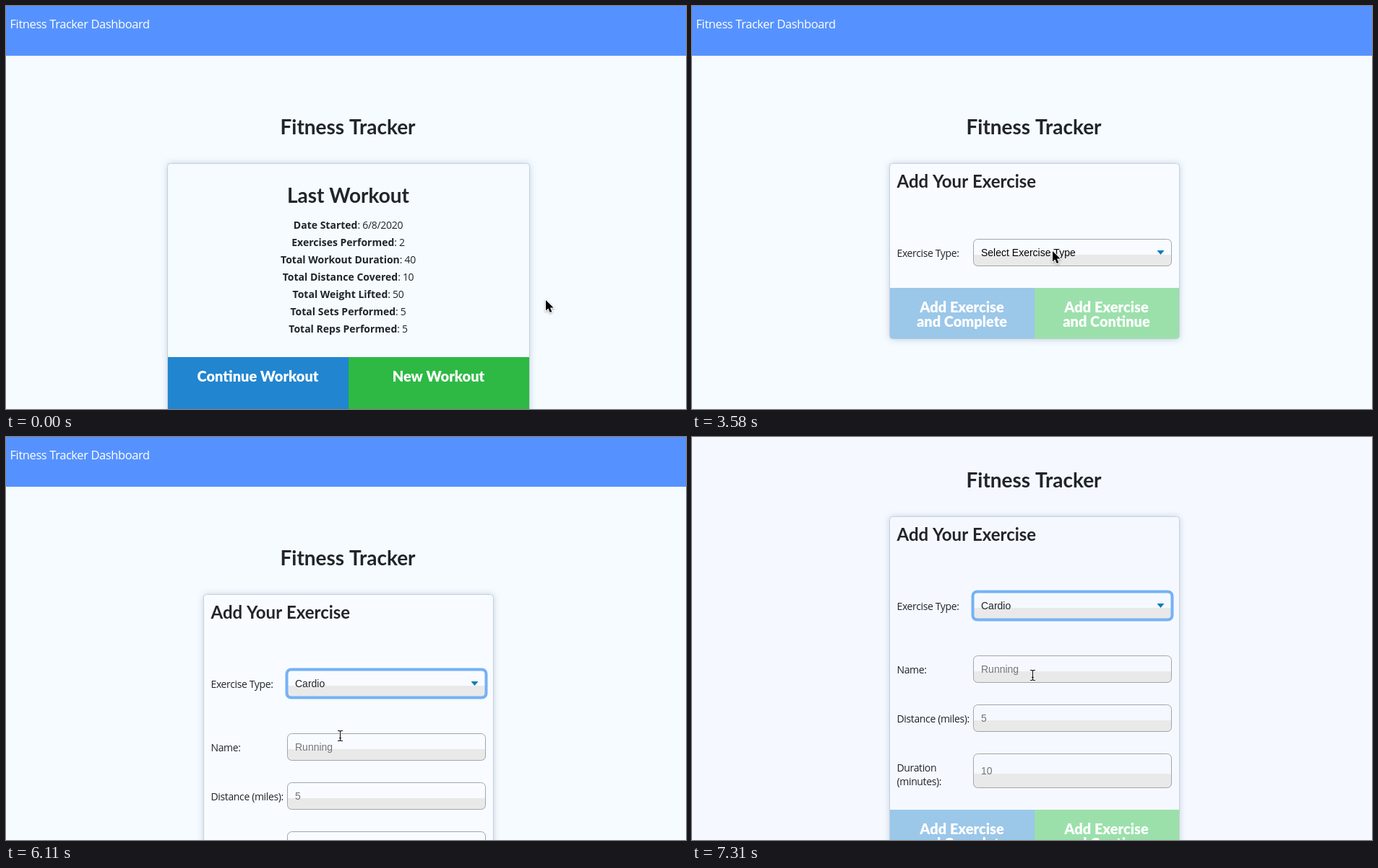
An HTML page with a canvas that plays this animation: 941x559 px, repeating every 8 s.

```html
<!DOCTYPE html>
<html lang="en">
<head>
<meta charset="utf-8">
<title>Fitness Tracker</title>
<style>
html, body { margin: 0; width: 100%; height: 100%; overflow: hidden; background: #f5fbff; }
canvas { display: block; }
</style>
</head>
<body>
<canvas id="stage" width="941" height="559"></canvas>
<script>
const ctx = document.getElementById('stage').getContext('2d');
const LOOP = 8000, TICK = 150;
const HEAD = 'Lato, sans-serif';
const BODY = '"Open Sans", sans-serif';
const FIELD = '"Liberation Sans", Arial, sans-serif';
const MENU = 'Inter, sans-serif';
const INK = '#212529';

function text(str, x, y, font, color = INK, align = 'left', spacing = 0) {
  ctx.font = font;
  ctx.fillStyle = color;
  ctx.textAlign = align;
  ctx.letterSpacing = spacing + 'px';
  ctx.fillText(str, x, y);
}

function rect(x, y, w, h, color) {
  ctx.fillStyle = color;
  ctx.fillRect(x, y, w, h);
}

function round(x, y, w, h, r) {
  ctx.beginPath();
  ctx.roundRect(x, y, w, h, r);
}

const label = (str, y) => text(str, 283.5, y, '14px ' + BODY, INK, 'left', -0.36);

function card(x, y, w, h, fill) {
  ctx.save();
  ctx.shadowColor = 'rgba(110,135,175,.42)';
  ctx.shadowBlur = 10;
  ctx.shadowOffsetY = 1;
  round(x, y, w, h, 4);
  ctx.fillStyle = fill;
  ctx.fill();
  ctx.restore();
  round(x - 0.5, y + 0.5, w + 1, h, 4);
  ctx.strokeStyle = '#cbd0d6';
  ctx.lineWidth = 1;
  ctx.stroke();
}

function stats() {
  card(224, 218, 500, 400, '#f5fbff');
  text('Last Workout', 473.5, 273, '700 28px ' + HEAD, INK, 'center');
  const rows = [
    ['Date Started', '6/8/2020'], ['Exercises Performed', '2'],
    ['Total Workout Duration', '40'], ['Total Distance Covered', '10'],
    ['Total Weight Lifted', '50'], ['Total Sets Performed', '5'],
    ['Total Reps Performed', '5']
  ];
  const bold = '700 14px ' + BODY, plain = '14px ' + BODY;
  rows.forEach(([name, value], i) => {
    const y = 309 + 24 * i, rest = ': ' + value;
    ctx.letterSpacing = '0px';
    ctx.font = bold;
    const a = ctx.measureText(name).width;
    ctx.letterSpacing = '-0.3px';
    ctx.font = plain;
    const x = 473.5 - (a + ctx.measureText(rest).width) / 2;
    text(name, x, y, bold);
    text(rest, x + a, y, plain, INK, 'left', -0.3);
  });
}

function statButtons(hover) {
  rect(224, 487, 250, 72, hover ? '#1a78c2' : '#2185d0');
  rect(474, 487, 250, 72, '#2db944');
  const font = '900 20px ' + HEAD;
  text('Continue Workout', 348.5, 520.5, font, '#fff', 'center');
  text('New Workout', 598.5, 520.5, font, '#fff', 'center');
}

function field(y, h, value, baseline, color) {
  const split = y + Math.floor(h * 0.59);
  ctx.save();
  round(389, y, 275, h, 6);
  ctx.clip();
  rect(389, split, 275, y + h - split, '#e9e9e9');
  ctx.restore();
  round(389.5, y + 0.5, 274, h - 1, 6);
  ctx.strokeStyle = '#a3a5a8';
  ctx.lineWidth = 1;
  ctx.stroke();
  text(value, 400, baseline, '14px ' + FIELD, color);
}

function select(value, focused) {
  field(323, 38, value, 347, focused ? INK : '#000');
  ctx.beginPath();
  ctx.moveTo(643.5, 339);
  ctx.lineTo(653.5, 339);
  ctx.lineTo(648.5, 345);
  ctx.fillStyle = '#0c7cb5';
  ctx.fill();
  if (!focused) return;
  round(388.5, 322.5, 276, 39, 6);
  ctx.strokeStyle = '#74b2f6';
  ctx.lineWidth = 4;
  ctx.stroke();
}

function form(focused, expanded, fill) {
  const foot = expanded ? 625 : 391;
  card(274, 218, 400, foot - 148, fill);
  text('Add Your Exercise', 283.5, 252, '700 24px ' + HEAD);
  label('Exercise Type:', 348);
  select(expanded ? 'Cardio' : 'Select Exercise Type', focused);
  if (expanded) {
    label('Name:', 436);
    field(411, 38, 'Running', 435, '#757575');
    label('Distance (miles):', 504);
    field(479, 38, '5', 503, '#757575');
    label('Duration', 572);
    label('(minutes):', 591);
    field(547, 48, '10', 576, '#757575');
  }
  ctx.save();
  round(274, foot, 400, 70.5, [0, 0, 4, 4]);
  ctx.clip();
  rect(274, foot, 200, 71, '#9bc7e9');
  rect(474, foot, 200, 71, '#9be0ab');
  ctx.restore();
  [['and Complete', 373.5], ['and Continue', 573.5]].forEach(([line, x]) => {
    const font = '900 20px ' + HEAD;
    text('Add Exercise', x, foot + 34, font, '#fff', 'center');
    text(line, x, foot + 54, font, '#fff', 'center');
  });
}

function menu(active, alpha) {
  ctx.save();
  ctx.globalAlpha = alpha;
  ctx.save();
  ctx.shadowColor = 'rgba(0,0,0,.4)';
  ctx.shadowBlur = 12;
  ctx.shadowOffsetY = 4;
  round(378.5, 328.5, 276, 65.5, 5);
  ctx.fillStyle = '#ebeff0';
  ctx.fill();
  ctx.restore();
  ctx.strokeStyle = '#c3c7ca';
  ctx.lineWidth = 1;
  ctx.stroke();
  if (active) rect(379, 333 + 19 * active, 275, 19, '#3b91fd');
  ctx.beginPath();
  ctx.moveTo(385, 343);
  ctx.lineTo(388, 347);
  ctx.lineTo(393, 338);
  ctx.strokeStyle = '#aeb1b3';
  ctx.lineWidth = 1.5;
  ctx.stroke();
  ['Select Exercise Type', 'Resistance', 'Cardio'].forEach((item, i) => {
    const color = i === 0 ? '#b3b6b8' : i === active ? '#fff' : '#2b2d2f';
    text(item, 400, 347 + 19 * i, '13.4px ' + MENU, color);
  });
  ctx.restore();
}

const ARROW = new Path2D('M0 0V14.5L3.4 11.4L5.8 17L8.4 15.9L6 10.5H10.6Z');
const HAND = new Path2D('M4 9V2.2C4 .5 6.6 .5 6.6 2.2V6.5C7.2 5.6 9 5.8 9.2 7C10 6.2 11.6 6.6 11.8 7.8C12.8 7.2 14 8 14 9V12.5L12.5 17H5.8L4.5 14.2L.9 9.8C0 8.4 1.6 7.4 2.6 8.4Z');
const HAND_LINES = new Path2D('M7.6 11.5V14.5M9.6 11.5V14.5M11.6 11.5V14.5');
const BEAM = new Path2D('M0 .5H2.5L3.5 1.5L4.5 .5H7M3.5 1.5V13.5M0 14.5H2.5L3.5 13.5L4.5 14.5H7M2 10.5H5');

const cursors = {
  arrow() {
    ctx.shadowColor = 'rgba(0,0,0,.35)';
    ctx.shadowBlur = 3;
    ctx.shadowOffsetY = 1;
    ctx.strokeStyle = '#fff';
    ctx.lineWidth = 2;
    ctx.stroke(ARROW);
    ctx.shadowColor = 'transparent';
    ctx.fillStyle = '#000';
    ctx.fill(ARROW);
  },
  hand() {
    ctx.translate(-4.5, -1);
    ctx.fillStyle = '#fff';
    ctx.fill(HAND);
    ctx.strokeStyle = '#000';
    ctx.lineWidth = 1.1;
    ctx.stroke(HAND);
    ctx.lineWidth = 0.8;
    ctx.stroke(HAND_LINES);
  },
  beam() {
    ctx.translate(-3, -7);
    ctx.strokeStyle = '#fff';
    ctx.lineWidth = 2.4;
    ctx.stroke(BEAM);
    ctx.strokeStyle = '#111';
    ctx.lineWidth = 1.1;
    ctx.stroke(BEAM);
  }
};

// Pointer legs: start, steps, x, y, shape while moving, shape on arrival.
const legs = [
  [1200, 4, 390, 503, 'arrow', 'hand'],
  [2980, 5, 499, 340, 'arrow', 'arrow'],
  [4470, 1, 501, 368, 'arrow', 'arrow'],
  [4620, 2, 496, 377, 'arrow', 'arrow'],
  [5960, 2, 462, 414, 'arrow', 'beam'],
  [6860, 4, 471, 330, 'beam', 'beam']
];

function pointer(t) {
  let x = 747, y = 408, shape = 'arrow';
  for (const [start, steps, tx, ty, moving, arrived] of legs) {
    if (t < start) break;
    const k = Math.min(1, (Math.floor((t - start) / TICK) + 1) / steps);
    const e = k * k * (3 - 2 * k);
    x += (tx - x) * e;
    y += (ty - y) * e;
    shape = k < 1 ? moving : arrived;
  }
  ctx.save();
  ctx.translate(x, y);
  cursors[shape]();
  ctx.restore();
}

function draw(t) {
  const scroll = t < 6710 ? 0 : t < 6860 ? 105 : 108;
  rect(0, 0, 941, 559, scroll ? '#f5f9ff' : '#f5fbff');
  ctx.save();
  ctx.translate(0, -scroll);
  rect(0, 0, 941, 69, '#5692ff');
  text('Fitness Tracker Dashboard', 5.5, 31, '16.5px ' + BODY, '#fff', 'left', -0.4);
  text('Fitness Tracker', 473, 178, '700 28px ' + HEAD, INK, 'center');
  if (t < 2540) {
    stats();
    statButtons(t >= 1500);
  } else {
    form(t >= 3880, t >= 5370, scroll ? '#f5f9ff' : '#f8fbff');
  }
  if (t >= 3880 && t < 5670) {
    const active = t < 4470 ? 0 : t < 4620 ? 1 : t >= 5220 && t < 5370 ? 0 : 2;
    menu(active, t < 5370 ? 1 : t < 5520 ? 0.6 : 0.25);
  }
  ctx.restore();
  pointer(t);
}

const begin = performance.now();
function loop() {
  draw((performance.now() - begin) % LOOP);
  requestAnimationFrame(loop);
}
loop();
</script>
</body>
</html>
```
